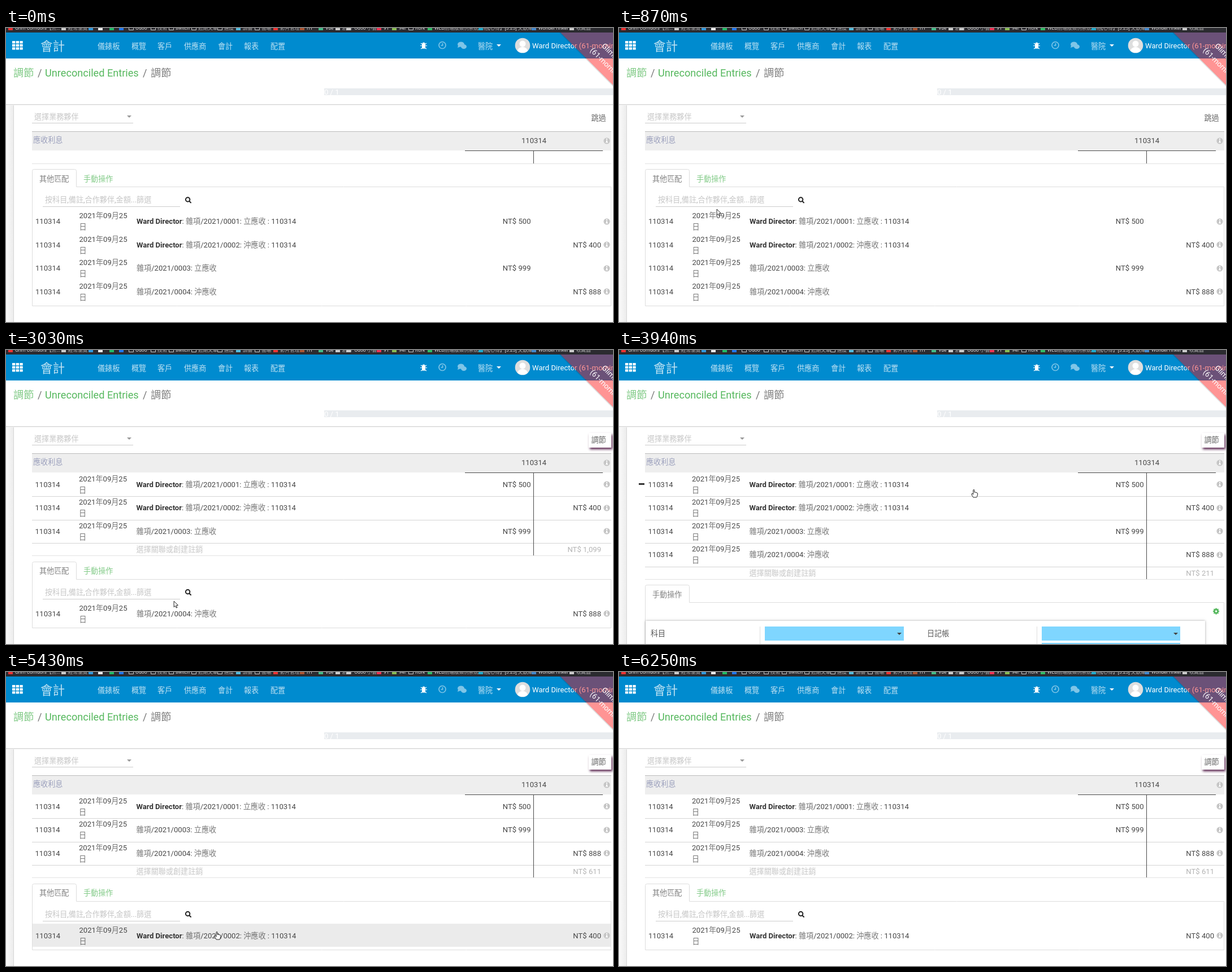
Write an HTML page with a canvas that moves like this. It is 1074 by 521 pixels and loops after 6720 ms.

```html
<!DOCTYPE html>
<html lang="zh-Hant">
<head>
<meta charset="utf-8">
<style>
html, body { margin: 0; width: 100%; height: 100%; overflow: hidden; background: #fff }
canvas { display: block }
</style>
</head>
<body>
<canvas id="stage" width="1074" height="521"></canvas>
<script>
const ctx = document.getElementById('stage').getContext('2d');
const LOOP = 6720, ROW = 41.5, SIZE = 13.1, TITLE = 18.15;
const INK = '#484848', PALE = '#b4b4b4', GREEN = '#56b85e', LINE = '#ddd', RULE = '#4a4a4a';
const USER = 'Ward Director', LEFT = 46, RIGHT = 1071;

const entries = [
  { user: USER, text: '雜項/2021/0001: 立應收 : 110314', amount: 500 },
  { user: USER, text: '雜項/2021/0002: 沖應收 : 110314', amount: -400 },
  { text: '雜項/2021/0003: 立應收', amount: 999 },
  { text: '雜項/2021/0004: 沖應收', amount: -888 }
];
// Which entries are matched, from each moment on
const matches = [[0, []], [1280, [0]], [2140, [0, 1]], [2640, [0, 1, 2]], [3450, [0, 1, 2, 3]], [4480, [0, 2, 3]]];
// Pointer path: time, x, y
const path = [
  [460, 120, 497], [600, 135, 420], [730, 155, 292], [870, 173, 321], [1080, 183, 342], [1610, 183, 345],
  [2070, 182, 381], [2140, 183, 384], [2280, 190, 438], [2640, 205, 432], [3030, 297, 445], [3380, 330, 462],
  [3450, 332, 463], [3720, 600, 372], [3940, 628, 247], [4410, 500, 278], [4670, 500, 278], [5290, 372, 461],
  [5430, 372, 461], [5660, 620, 250], [5970, 1049, 508], [6250, 1066, 521]
];

function box(x, y, w, h, color) {
  ctx.fillStyle = color;
  ctx.fillRect(x, y, w, h);
}
const hline = (x1, x2, y, color = LINE) => box(x1, Math.round(y), x2 - x1, 1, color);
const vline = (x, y1, y2, color = LINE) => box(x, Math.round(y1), 1, Math.round(y2) - Math.round(y1), color);

function disc(x, y, r, color) {
  ctx.fillStyle = color;
  ctx.beginPath();
  ctx.arc(x, y, r, 0, 7);
  ctx.fill();
}

function shape(points, fill, stroke) {
  ctx.beginPath();
  points.forEach(([x, y]) => ctx.lineTo(x, y));
  ctx.closePath();
  ctx.fillStyle = fill;
  ctx.fill();
  if (!stroke) return;
  ctx.strokeStyle = stroke;
  ctx.lineWidth = 1;
  ctx.stroke();
}

function strokePath(d, color, width) {
  ctx.strokeStyle = color;
  ctx.lineWidth = width;
  ctx.stroke(new Path2D(d));
}

// Draws text centred on y, with Chinese runs lighter; returns the end x
function text(str, x, y, color = INK, size = SIZE, weight = 400) {
  ctx.fillStyle = color;
  for (const run of str.match(/[\u2e80-\uffff]+|[^\u2e80-\uffff]+/g)) {
    const chinese = run > '\u2e80';
    ctx.font = `${chinese ? 300 : weight} ${size}px ${chinese ? '"Noto Sans CJK TC", "Noto Sans CJK"' : 'Roboto'}, sans-serif`;
    ctx.globalAlpha = chinese ? .75 : 1;
    ctx.fillText(run, x, y + size * .36);
    x += ctx.measureText(run).width;
  }
  ctx.globalAlpha = 1;
  return x;
}

function textRight(str, x, y, color) {
  ctx.textAlign = 'right';
  text(str, x, y, color);
  ctx.textAlign = 'left';
}

const caret = (x, y, color) => shape([[x - 4, y - 2], [x + 4, y - 2], [x, y + 2]], color);
const money = n => 'NT$ ' + Math.abs(n).toLocaleString('en-US');

function info(x, y) {
  disc(x, y, 5.6, '#c6c6c6');
  box(x - 1, y - 4, 2, 2, '#fff');
  box(x - 1, y - 1, 2, 4, '#fff');
  box(x - 2, y + 2, 4, 1.3, '#fff');
}

function bookmarks() {
  box(0, 0, 1074, 8, '#2b2b30');
  const items = [
    [4, 'Grim Corridors【黑...', '#e33'], [98, '經常瀏覽', '#ccc'], [146, '', '#39d'], [163, '', '#eee'],
    [183, '', '#2b6'], [200, '', '#27e'], [217, 'Odoo'], [256, '技術'], [288, 'switch'], [328, '近期文章'],
    [374, '進度'], [407, '讀書', '#5bd'], [440, '雲端'], [473, '影片管理', '#e33'], [520, 'ITI', '#a53'],
    [553, 'Vue', '#4b8'], [583, '創器', '#ccc'], [602, ' Odoo 小書', '#ccc'], [656, '91', '#e35'],
    [683, '94I', '#8b5'], [712, 'RUN'], [746, 'WEB前端版案例系統規格', '#3b6'],
    [836, '【心得】[3.25] 文獻庫...', '#2ac'], [930, 'WonderTinker', '#48c'], [997, '收藏圖', '#ccc']
  ];
  for (const [x, label, color] of items) {
    if (color) box(x, 0, 8, 4, color);
    else strokePath(`M${x + .5} -2V3.5h8V-2`, '#ccc', 1);
    if (label) text(label, x + 12, 0, '#ddd', 8.6);
  }
}

function navbar() {
  box(0, 8, 1074, 46, '#008bcf');
  for (let i = 0; i < 9; i++) box(11 + i % 3 * 6.7, 23 + Math.floor(i / 3) * 5.6, 5.3, 4.3, '#fff');
  text('會計', 61, 32, '#fff', 21.6);
  [[162, '儀錶板'], [222, '概覽'], [268, '客戶'], [315, '供應商'], [375, '會計'], [421, '報表'], [468, '配置'], [835, '醫院']]
    .forEach(([x, label]) => text(label, x, 32, '#fff'));
  caret(872, 31, '#fff');

  strokePath('M734 27l3 2M744 27l-3 2M733 31.5h12M734 37l3-2M744 37l-3-2', '#fff', 1.2);
  disc(739, 28, 2.5, '#fff');
  box(736, 28.5, 6, 8, '#fff');
  strokePath('M778 30.5a6 6 0 1 1-12 0a6 6 0 1 1 12 0M772.5 27v4h-3', '#7fc5e7', 1.7);
  ctx.fillStyle = '#7fc5e7';
  ctx.beginPath();
  ctx.ellipse(805, 29, 6, 4.5, 0, 0, 7);
  ctx.ellipse(810, 33, 5, 4, 0, 0, 7);
  ctx.fill();
  shape([[800, 31], [804, 33], [799, 35]], '#7fc5e7');

  disc(914, 31, 13.3, '#dedede');
  ctx.save();
  ctx.beginPath();
  ctx.arc(914, 31, 13, 0, 7);
  ctx.clip();
  disc(914, 28, 5.5, '#fff');
  disc(914, 43, 9.5, '#fff');
  ctx.restore();
  text(USER + ' (61-morning)', 931, 31.5, '#fff');
}

function ribbon() {
  ctx.save();
  ctx.beginPath();
  ctx.rect(0, 8, 1074, 120);
  ctx.clip();
  strokePath('M980 8L1083 111', 'rgba(0,0,0,.12)', 2);
  shape([[981, 8], [1084, 111], [1084, 8]], 'rgba(255,0,0,.42)');
  ctx.translate(1036, 37);
  ctx.rotate(Math.PI / 4);
  text('(61-morning)', 0, 0, '#fff');
  text('Glimmer', 9, -20, '#fff');
  ctx.restore();
}

function pageHead() {
  text('調節', 13, 79, GREEN, TITLE);
  text('/', 56, 79, '#777', TITLE);
  text('Unreconciled Entries', 69, 79, GREEN, TITLE);
  text('/', 242, 79, '#777', TITLE);
  text('調節', 256, 79, '#555', TITLE);
  box(563, 107, 511, 12, '#e9ecef');
  text('0 / 1', 563, 113, '#fff');
  hline(0, 1074, 135, '#d4d4d4');
  hline(0, 1074, 136, '#f0f0f0');
  const margin = ctx.createLinearGradient(0, 0, 13, 0);
  margin.addColorStop(0, '#fafafa');
  margin.addColorStop(1, '#ececec');
  box(0, 137, 13, 384, margin);
  vline(13, 137, 521, '#d6d6d6');
}

function account(count) {
  text('選擇業務夥伴', 50, 157, PALE);
  caret(218, 157, '#999');
  hline(LEFT, 225, 168, '#ccc');
  if (count) {
    ctx.save();
    ctx.shadowColor = '#5f2d55';
    ctx.shadowBlur = 4;
    ctx.shadowOffsetX = 2;
    ctx.shadowOffsetY = 3;
    box(1031, 147, 40, 26, '#fff');
    ctx.restore();
  }
  text(count > 1 ? '調節' : '跳過', 1035.5, 159.5, '#333');
  box(LEFT, 183, RIGHT - LEFT, 34, '#eee');
  hline(LEFT, RIGHT, 183, '#bbb');
  text('應收利息', 48, 198, '#7f86ab');
  text('110314', 912, 199.5);
  info(1063, 200);
}

function entryRow({ user, text: label, amount }, x, y) {
  text('110314', x, y);
  text('2021年09月25', x + 77.5, y - 10);
  text('日', x + 77.5, y + 10);
  let end = x + 179;
  if (user) end = text(': ', text(user, end, y, '#333', SIZE, 700), y);
  text(label, end, y);
  textRight(money(amount), amount > 0 ? 928.5 : 1053, y);
  info(1063, Math.round(y));
}

function matchedRows(rows, hovered) {
  const end = 217.5 + ROW * rows.length;
  rows.forEach((entry, i) => {
    const y = 238 + ROW * i;
    entryRow(entry, 51.5, y);
    hline(LEFT, RIGHT, y + 21, '#d4d4d4');
    if (i === hovered) box(35, Math.round(y) - 2, 10, 3, '#333');
  });
  if (rows.length) {
    text('選擇關聯或創建註銷', 230.5, end + 11.5, PALE);
    const balance = rows.reduce((sum, entry) => sum + entry.amount, 0);
    textRight(money(balance), 1053, end + 11.5, PALE);
  }
  hline(LEFT, RIGHT, end + 22, '#e2e2e2');
  hline(812, 1056, 217, RULE);
  vline(933, 217, end + 22, RULE);
}

function tabs(top, bottom, labels) {
  const y = Math.round(top) + .5;
  strokePath(`M${LEFT + .5} ${bottom}V${y + 3}q0-3 3-3H121.5q3 0 3 3V${y + 31}H${RIGHT - .5}V${bottom}Z`, LINE, 1);
  labels.forEach((label, i) => text(label, i ? 137 : 59, top + 17, i ? GREEN : '#555'));
}

function openEntries(rows, top, hovered) {
  tabs(top, 492.5, ['其他匹配', '手動操作']);
  text('按科目,備註,合作夥伴,金額...篩選', 69, top + 54.5, PALE);
  hline(65, 308, top + 66, '#ccc');
  const y = top + 54;
  strokePath(`M325.3 ${y}a3.7 3.7 0 1 1-7.4 0a3.7 3.7 0 1 1 7.4 0M324.2 ${y + 2.7}l3.4 3.4`, '#222', 2);
  rows.forEach((entry, i) => {
    const middle = top + 92.5 + ROW * i;
    if (i === hovered) box(47, Math.round(middle - 21), 1023, 41, '#ebebeb');
    entryRow(entry, 52, middle);
  });
}

function manualForm(top) {
  tabs(top, 530, ['手動操作']);
  for (let i = 0; i < 8; i++) {
    const a = i * Math.PI / 4;
    disc(1056.5 + 4.4 * Math.cos(a), 463 + 4.4 * Math.sin(a), 1.3, GREEN);
  }
  disc(1056.5, 463, 4.2, GREEN);
  disc(1056.5, 463, 1.7, '#fff');
  ctx.save();
  ctx.shadowColor = 'rgba(0,0,0,.35)';
  ctx.shadowBlur = 4;
  box(47, 480, 990, 60, '#fff');
  ctx.restore();
  [['科目', 56, 258, 246], ['日記帳', 545, 748, 245]].forEach(([label, x, field, width]) => {
    text(label, x, 502, '#222');
    vline(field - 9, 490, 521);
    box(field, 490, width, 25, '#7fd6ff');
    caret(field + width - 8, 503, '#444');
  });
  box(748, 519, 245, 2, '#7fd6ff');
}

function pointer(x, y, hand) {
  ctx.save();
  ctx.translate(x, y);
  if (hand) shape([[-1, 1], [0, 0], [1, 1], [1, 5], [3, 5], [6, 6], [7, 8], [6, 12], [5, 14], [-1, 14], [-4, 9], [-3, 7], [-1, 9]], '#fff', '#222');
  else shape([[0, 0], [0, 10.5], [2.4, 8.3], [4.2, 12], [5.8, 11.2], [4.2, 7.7], [7.3, 7.3]], '#fff', '#222');
  ctx.restore();
}

function pointerAt(t) {
  const next = path.findIndex(key => key[0] > t);
  if (next < 1) return null;
  const [t0, x0, y0] = path[next - 1], [t1, x1, y1] = path[next];
  const k = (t - t0) / (t1 - t0);
  return [x0 + (x1 - x0) * k, y0 + (y1 - y0) * k];
}

function draw(t) {
  const matched = matches.findLast(([start]) => start <= t)[1];
  const rows = matched.map(i => entries[i]);
  const open = entries.filter((_, i) => !matched.includes(i));
  const top = 250 + ROW * rows.length;
  const cursor = pointerAt(t);
  const rowUnder = (start, count) => {
    if (!cursor || cursor[0] < LEFT || cursor[0] > RIGHT) return -1;
    const i = Math.floor((cursor[1] - start) / ROW);
    return i < count ? i : -1;
  };
  const upper = rowUnder(217, rows.length), lower = rowUnder(top + 72, open.length);

  box(0, 0, 1074, 521, '#fff');
  bookmarks();
  navbar();
  pageHead();
  ribbon();
  account(rows.length);
  matchedRows(rows, upper);
  if (open.length) openEntries(open, top, lower);
  else manualForm(top);
  if (cursor) pointer(...cursor, upper >= 0 || lower >= 0);
}

function tick() {
  draw(performance.now() % LOOP);
  requestAnimationFrame(tick);
}
tick();
</script>
</body>
</html>
```
